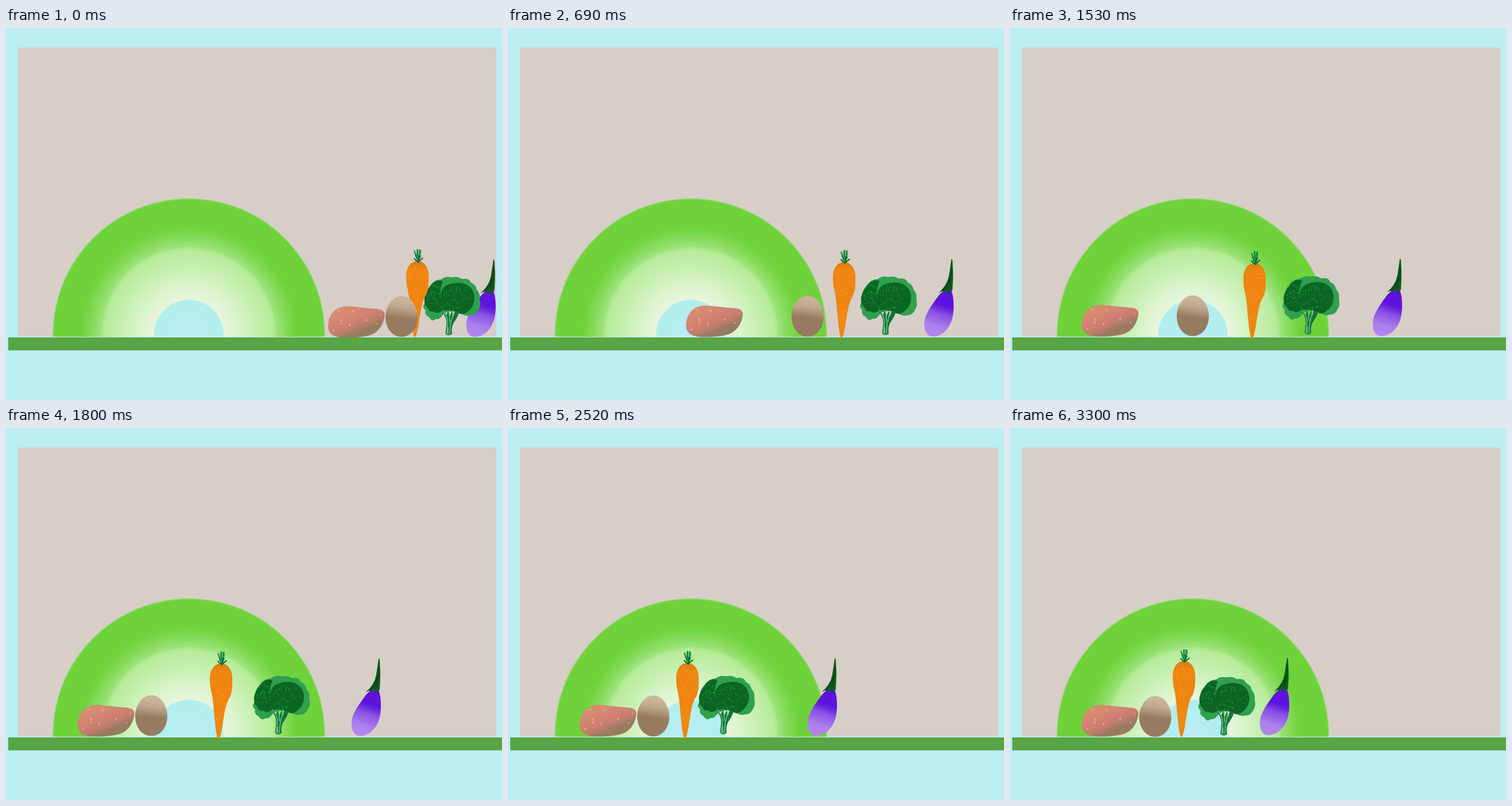
Write an HTML page that moves like this. It is 864 px wide and 648 px high and loops after 4.63 s.

```html
<!DOCTYPE html>
<html lang="en">
<head>
<meta charset="utf-8">
<title>Vegetables</title>
<style>
html, body { margin: 0; width: 100%; height: 100%; overflow: hidden; background: #bcedf1 }
svg { display: block; width: 100vw; height: 100vh }
.line { fill: none; stroke-linecap: round; stroke-linejoin: round }
</style>
</head>
<body>
<svg id="stage" viewBox="0 0 864 648">
  <defs>
    <clipPath id="above"><path d="M0 0H864V537.6H0Z"/></clipPath>
    <radialGradient id="hole"><stop offset=".25" stop-color="#b9ecf3"/><stop offset=".75" stop-color="#b2eeed"/></radialGradient>
    <linearGradient id="potatoFill" gradientUnits="userSpaceOnUse" x1="165" y1="488" x2="185" y2="536">
      <stop stop-color="#d68b71"/><stop offset=".4" stop-color="#d07f72"/>
      <stop offset=".58" stop-color="#c07d6d"/><stop offset=".8" stop-color="#977b60"/>
    </linearGradient>
    <linearGradient id="eggFill" gradientUnits="userSpaceOnUse" x1="255" y1="474" x2="251" y2="505">
      <stop stop-color="#c9b399"/><stop offset=".4" stop-color="#bfa78d"/>
      <stop offset=".65" stop-color="#b0967b"/><stop offset="1" stop-color="#977b60"/>
    </linearGradient>
    <linearGradient id="carrotFill" x2="0" y2="1">
      <stop stop-color="#d97c12"/><stop offset=".12" stop-color="#ef850f"/>
    </linearGradient>
    <linearGradient id="plantFill" gradientUnits="userSpaceOnUse" x1="466" y1="479" x2="450" y2="531">
      <stop stop-color="#5e14dc"/><stop offset=".12" stop-color="#6a27de"/><stop offset=".32" stop-color="#8b53e6"/>
      <stop offset=".58" stop-color="#9e6eea"/><stop offset=".7" stop-color="#ab7eed"/><stop offset="1" stop-color="#b285ef"/>
    </linearGradient>
  </defs>

  <path fill="#d6cec7" d="M21 34H854V537.6H21Z"/>
  <g id="dome" clip-path="url(#above)"></g>
  <path fill="#57a544" d="M4 539H864V561.5H4Z"/>

  <g id="eggplant">
    <path fill="url(#plantFill)" d="M435.5 518C433 500 447 482 461 463Q470 452 482 454C487 465 488 488 484 504C479 522 466 535 450 535C441 535 436.500 528 435.500 518Z"/>
    <path fill="#0d5b1d" d="M482.500 400Q485 400 484.600 410Q486.500 430 484 456L480.500 454L479 464L474 454L467 459L467 456L460 459Q475 446 478 430Q481 412 482.500 400Z"/>
    <path class="line" stroke="#0a4013" stroke-width="1.500" d="M483 412Q483 435 477 451M480 432Q478 445 468 455"/>
  </g>

  <g id="broccoli">
    <path fill="#2fa04e" d="M328 484L331 478Q328 472 331 466Q334 455 338 452Q342 444 350 440Q356 438 359 438Q366 432 377 434.500Q388 432 395 437.500Q408 435 411 444Q420 448 421 456Q428 464 426 472Q429 484 424 491Q420 501 410 501Q402 503 396 499L385 494Q370 492 362 500Q356 509 350 507Q343 513 338 504Q329 500 332 492Q327 488 328 484Z"/>
    <path fill="#0b6522" d="M330 476Q330 460 341 449Q350 437 362 441Q356 455 358 470Q358 485 362 492Q352 500 346 494Q338 496 336 488Q330 484 330 476Z"/>
    <path fill="#0b6522" d="M358 474Q356 452 372 447Q388 441 403 447Q416 454 417 470Q417 486 404 495Q396 502 388 496Q372 490 364 493Q358 486 358 474Z"/>
    <path fill="#147238" d="M360 494Q370 505 368 518L366.500 533Q372 538 378 533Q376 520 382 512Q387 505 390 497L383 493L380 504L378 493L374 503L371 493L368 501Z"/>
    <path class="line" stroke="#66c486" stroke-width="1.600" d="M365 496Q372 506 370 520L369 533M373 495L374 512M380 496Q377 508 375 518L374 533M371 522L371 533"/>
  </g>

  <g id="carrot">
    <path fill="url(#carrotFill)" d="M303 406C314 406 322 416 322.500 430C323 445 322 458 318 465C312 473 309 490 306 510C304 525 301 538 298.500 538C295 537 293 515 291 495C289.500 475 289 470 286 455C283 445 283 430 284 425C286 414 293 406 303 406Z"/>
    <path class="line" stroke="#0d6e30" stroke-width="2.200" d="M304 407L303 386M304 406L308 387M304 408L312 401M303 407L297.500 402M302 402L298 389M305 405L308 397"/>
    <path class="line" stroke="#27a557" stroke-width="1.500" d="M298 388L299 394M302 389L302 398M306 386L306 395M309 391L308 396M304 398L303 404"/>
  </g>

  <g id="egg">
    <path fill="url(#eggFill)" d="M253 467C269 467 281 485 281 503C281 523 269 538 253 538C237 538 225 523 225 503C225 485 237 467 253 467Z"/>
  </g>

  <g id="potato">
    <path fill="url(#potatoFill)" d="M125 515C126 497 138 482.500 158 482.500C176 483 192 486 209 487C220 487.500 225 492 223.500 500C221 517 210 531 194 534C180 537 165 538 148 537C132 536 124 528 125 515Z"/>
    <path class="line" stroke="#e9b97c" stroke-width="1.700" d="M142 491L145 489.500M167 493L169.500 490.500M147 506L149 508.500M147.500 512L148.500 514M162 516.500L163.500 513.500M191 507.500L193 506M209.500 513.500L211 513M216.500 497L217.500 497.500M133.500 525L135.500 524"/>
  </g>
</svg>
<script>
const $ = id => document.getElementById(id);
const LOOP = 4630, STEP = 30, STOP = 3300;

function add(parent, tag, attrs) {
  const el = document.createElementNS("http://www.w3.org/2000/svg", tag);
  for (const k in attrs) el.setAttribute(k, attrs[k]);
  parent.appendChild(el);
}

let seed = 7;
const rand = () => (seed = seed * 16807 % 2147483647) / 2147483647;

// Piecewise linear interpolation over rows of [position, ...values]
function along(rows, p) {
  let i = 1;
  while (i < rows.length - 1 && p > rows[i][0]) i++;
  const a = rows[i - 1], b = rows[i];
  const k = Math.max(0, Math.min(1, (p - a[0]) / (b[0] - a[0])));
  return a.slice(1).map((v, j) => v + (b[j + 1] - v) * k);
}

// Banded glow of the dome
const shades = [
  [62, 233, 245, 221], [85, 220, 244, 205], [115, 202, 240, 181],
  [150, 181, 235, 152], [156, 156, 226, 122], [170, 134, 219, 90], [190, 111, 210, 58]
];
const disc = (r, fill) => add($("dome"), "circle", { cx: 318.5, cy: 534, r, fill });
disc(237, "#84d95e");
disc(235.3, "#6fd23a");
for (let r = 188; r > 60; r -= 4) disc(r, `rgb(${along(shades, r).map(Math.round)})`);
disc(60.5, "url(#hole)");

// Small dots scattered in an ellipse
function specks(id, n, cx, cy, rx, ry, stroke, size) {
  let d = "";
  for (let i = 0; i < n; i++) {
    const a = rand() * 2 * Math.PI, q = Math.sqrt(rand());
    d += `M${(cx + rx * q * Math.cos(a)).toFixed(1)} ${(cy + ry * q * Math.sin(a)).toFixed(1)}l.3 ${(rand() * size).toFixed(1)}`;
  }
  add($(id), "path", { class: "line", d, stroke, "stroke-width": size });
}
specks("carrot", 70, 303, 438, 17, 28, "#f6b063", .7);
specks("carrot", 35, 300, 490, 6, 36, "#f6b063", .7);
specks("broccoli", 38, 346, 468, 12, 24, "#1f9c40", 1.4);
specks("broccoli", 42, 380, 470, 19, 22, "#1f9c40", 1.4);
specks("broccoli", 14, 404, 470, 10, 20, "#1f9c40", 1);
specks("broccoli", 40, 400, 466, 24, 26, "#238a42", .7);

// Offsets from the resting place: [ms, x, y]
const moves = {
  potato: [[0, 436, 2.2], [1200, 0, 0]],
  egg: [[0, 436, 0], [1800, 0, -1.5], [STOP, 0, 0]],
  carrot: [[0, 413.7, 0], [2100, 14.7, 5], [STOP, 0, 0]],
  broccoli: [[0, 399, -.2], [2400, 3.3, -2.2], [STOP, 0, 0]],
  eggplant: [[0, 366.5, 3], [STOP, 0, 0]]
};

const start = performance.now();
function draw() {
  const ms = (performance.now() - start) % LOOP;
  const t = Math.min(STOP, Math.floor(ms / STEP) * STEP);
  for (const id in moves) $(id).setAttribute("transform", `translate(${along(moves[id], t)})`);
  requestAnimationFrame(draw);
}
draw();
</script>
</body>
</html>
```
